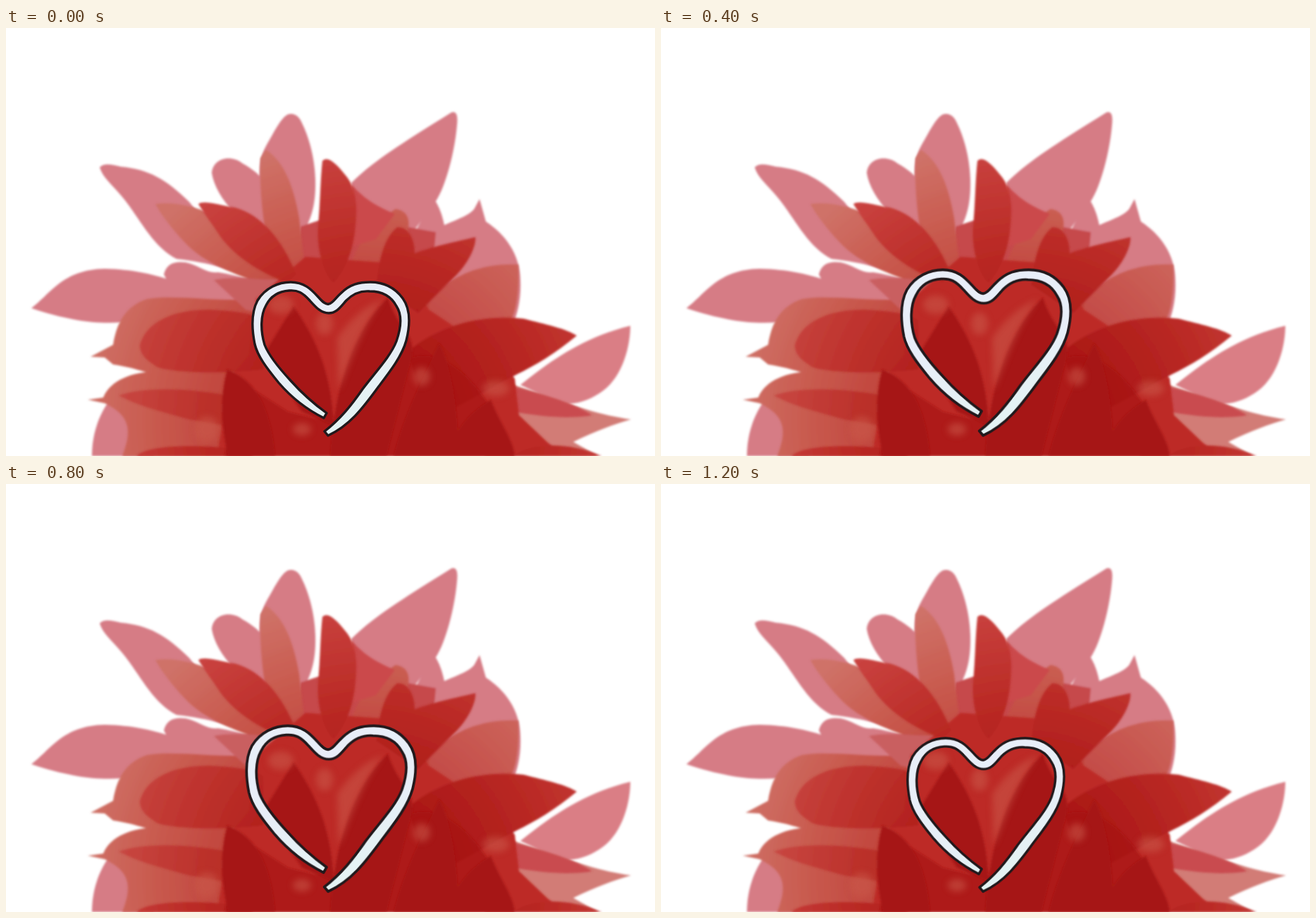
An HTML page that plays this animation: 921 px wide and 608 px high, repeating every 2.2 s.

```html
<!DOCTYPE html>
<html lang="en">
<head>
<meta charset="utf-8">
<title>Beating heart</title>
<style>
  html, body { margin: 0; width: 100%; height: 100%; overflow: hidden; background: #fff; }
  svg { display: block; width: 100vw; height: 100vh; }
  #heart { transform-box: view-box; transform-origin: 456px 580px; }
</style>
</head>
<body>
<svg viewBox="0 0 921 608" preserveAspectRatio="none">
  <defs>
    <filter id="soft" x="0" y="0" width="921" height="640" filterUnits="userSpaceOnUse"><feGaussianBlur stdDeviation="1.8"/></filter>
    <filter id="hazy" x="0" y="0" width="921" height="640" filterUnits="userSpaceOnUse"><feGaussianBlur stdDeviation="5"/></filter>
    <radialGradient id="salmon" gradientUnits="userSpaceOnUse" cx="500" cy="560" r="400">
      <stop offset=".35" stop-color="#bd3a33"/><stop offset=".75" stop-color="#c95c50"/><stop offset="1" stop-color="#cf7268"/>
    </radialGradient>
    <radialGradient id="red" gradientUnits="userSpaceOnUse" cx="520" cy="560" r="390">
      <stop offset=".3" stop-color="#ab1816"/><stop offset=".65" stop-color="#ba2a25"/><stop offset="1" stop-color="#c9423f"/>
    </radialGradient>
    <linearGradient id="ice" x1="0" y1="0" x2="0.3" y2="1">
      <stop offset="0.5" stop-color="#e8eef8"/><stop offset="1" stop-color="#e4f3f4"/>
    </linearGradient>
  </defs>

  <!-- pale outer petals -->
  <g fill="#d67b85" filter="url(#soft)">
    <path d="M133 198C139 191 150 194 163 197C203 201 226 214 260 247L340 350C300 336 262 330 242 328C207 310 190 270 165 240C150 222 137 212 133 198Z"/>
    <path d="M292 206C294 184 320 180 335 192C350 200 358 208 364 214L385 290L330 268C310 250 295 226 292 206Z"/>
    <path d="M404 122C395 122 388 135 380 148C368 170 360 178 360 210C361 240 358 265 366 290L415 300C433 276 440 252 439 215C438 180 428 150 418 131C414 124 409 122 404 122Z"/>
    <path d="M632 120C641 117 641 128 640 138C637 175 624 225 610 246L570 300L500 270L490 220C520 190 560 165 632 120Z"/>
    <path d="M672 243L681 275C707 292 730 320 730 360C731 385 726 405 720 420L600 440L575 300C592 270 600 250 607 242C616 255 620 270 622 280C640 272 660 265 665 256Z"/>
    <path d="M36 398C62 379 80 343 140 342C180 343 205 349 230 357L280 400L165 418C130 421 90 416 36 398Z"/>
    <path d="M224 350C228 334 240 331 255 333C272 336 285 349 300 347C322 350 345 357 380 365L370 420L250 400Z"/>
    <path fill="#da7e85" d="M886 423C886 450 876 498 842 519C822 532 802 536 785 533L730 507C765 480 810 442 886 423Z"/>
    <path d="M150 525C130 550 122 580 122 608H210V520Z"/>
    <path fill="#c64a4c" d="M418 282L442 274L500 270L610 290L600 400H400Z"/>
    <path fill="#d27c76" d="M700 500C760 520 830 549 887 556C862 563 838 572 805 588L840 608H680Z"/>
  </g>

  <!-- salmon petals -->
  <g fill="url(#salmon)" filter="url(#soft)">
    <path d="M212 250C240 246 275 255 300 268L420 350L380 368C320 350 280 332 255 306C235 285 220 265 212 250Z"/>
    <path d="M369 173C395 190 408 225 416 270L425 350L380 350C368 300 359 240 361 185Z"/>
    <path d="M120 467L152 450C157 418 170 395 200 385C240 378 300 390 365 385L365 500H240C200 490 180 482 152 478L140 468Z"/>
    <path d="M116 528L138 525C148 500 180 488 215 488C250 488 300 488 350 490V608H165C180 570 175 550 140 533Z"/>
    <path d="M553 257C570 260 574 272 570 290L530 370L485 360C490 320 510 283 553 257Z"/>
    <path d="M575 430C590 385 640 332 727 336C728 360 727 395 717 414L600 460Z" opacity=".85"/>
    <path fill="#c95e60" d="M295 358C330 350 370 362 400 355L420 420L340 400Z"/>
    <path fill="#cb4a4b" d="M490 222C510 245 530 255 552 264L525 300L492 310Z"/>
    <path fill="#c94c50" d="M715 508C760 520 800 530 832 550C800 556 760 552 720 545Z"/>
  </g>

  <!-- red heart of the flower -->
  <g fill="url(#red)" filter="url(#soft)">
    <path fill="#bd2b28" d="M355 385L425 325L560 335L600 400L690 460L722 498L728 550L770 590L800 608H300L315 500L345 465Z"/>
    <path d="M273 250C280 244 300 251 325 255C362 265 392 300 412 350L400 362C360 348 320 322 300 290C290 275 280 262 273 250Z"/>
    <path d="M449 189C456 180 470 194 480 207C499 228 499 255 495 290C490 325 480 345 465 362C450 350 440 310 443 280C446 250 446 215 449 189Z"/>
    <path d="M555 283C570 282 580 298 580 320C600 312 640 303 666 297C668 310 655 335 640 350L585 405L525 365C530 330 535 300 555 283Z"/>
    <path d="M190 450C200 415 240 400 290 400C320 402 350 404 365 415V485C310 492 240 490 215 482C200 472 190 465 190 450Z" opacity=".85"/>
    <path d="M160 522C200 508 270 512 330 525L340 570L260 556C220 545 185 536 160 522Z" opacity=".75"/>
    <path d="M570 460C610 425 670 406 735 413C765 421 795 427 810 437C780 462 750 480 725 492L600 560Z"/>
    <path d="M185 608C200 592 270 590 345 600V608ZM720 608C745 588 800 588 845 608Z"/>
  </g>

  <!-- deep shadows and small highlights -->
  <g fill="#a61413" filter="url(#soft)">
    <path opacity=".65" d="M570 470C620 450 680 500 722 608H310L330 500L400 545L460 560Z"/>
    <path d="M408 395C432 430 462 480 465 565L420 545L365 465Z"/>
    <path d="M542 383C560 440 590 430 570 490L540 608H460C465 540 480 440 542 383Z"/>
    <path d="M615 448C637 490 642 560 642 608H550C565 550 590 500 615 448Z"/>
    <path d="M688 528C700 560 720 585 722 608H625C640 565 660 545 688 528Z"/>
    <path d="M314 485C350 500 375 530 382 608H315C304 560 304 520 314 485Z"/>
  </g>
  <g fill="#cb5a4c" opacity=".55" filter="url(#hazy)">
    <path d="M470 440C485 420 500 400 535 385C505 425 490 470 472 515Z"/>
    <ellipse cx="390" cy="393" rx="18" ry="13"/>
    <ellipse cx="590" cy="495" rx="12" ry="13"/>
    <ellipse cx="452" cy="420" rx="12" ry="16"/>
    <ellipse cx="285" cy="570" rx="17" ry="18"/>
    <ellipse cx="695" cy="512" rx="19" ry="11"/>
    <ellipse cx="420" cy="570" rx="13" ry="9"/>
  </g>

  <path id="heart" fill="url(#ice)" stroke="#20191c" stroke-width="3.4" stroke-linejoin="round"
    d="M451 554C425 541 406 526 387 504C369 482 357 466 353 449C348 424 349 402 357 387C368 369 387 361 404 361C423 361 433 371 443 382C450 390 454 393 458 392C464 391 467 384 475 377C488 364 501 361 517 361C538 361 552 369 563 384C574 399 574 420 568 444C562 466 545 488 529 509C505 542 487 565 457 579L452 573C475 555 490 536 506 513C524 489 546 466 554 445C561 425 562 407 554 395C546 380 533 374 516 374C503 373 493 377 483 387C474 397 469 405 458 405C447 405 440 397 431 387C421 376 414 372 402 373C386 374 375 382 369 394C361 408 361 430 367 450C374 468 391 487 404 501C420 519 433 531 455 547Z"/>
</svg>
<script>
  const LOOP = 2200, STEP = 100;
  const beat = [1, 1.037, 1.08, 1.123, 1.08, 1.037];
  const scales = [...beat, ...beat, 1];

  const frames = scales.map((scale, i) => ({
    offset: i * STEP / LOOP,
    transform: `scale(${scale})`,
    easing: 'steps(1, end)'
  }));
  frames.push({ offset: 1, transform: 'scale(1)' });

  document.getElementById('heart').animate(frames, { duration: LOOP, iterations: Infinity });
</script>
</body>
</html>
```
